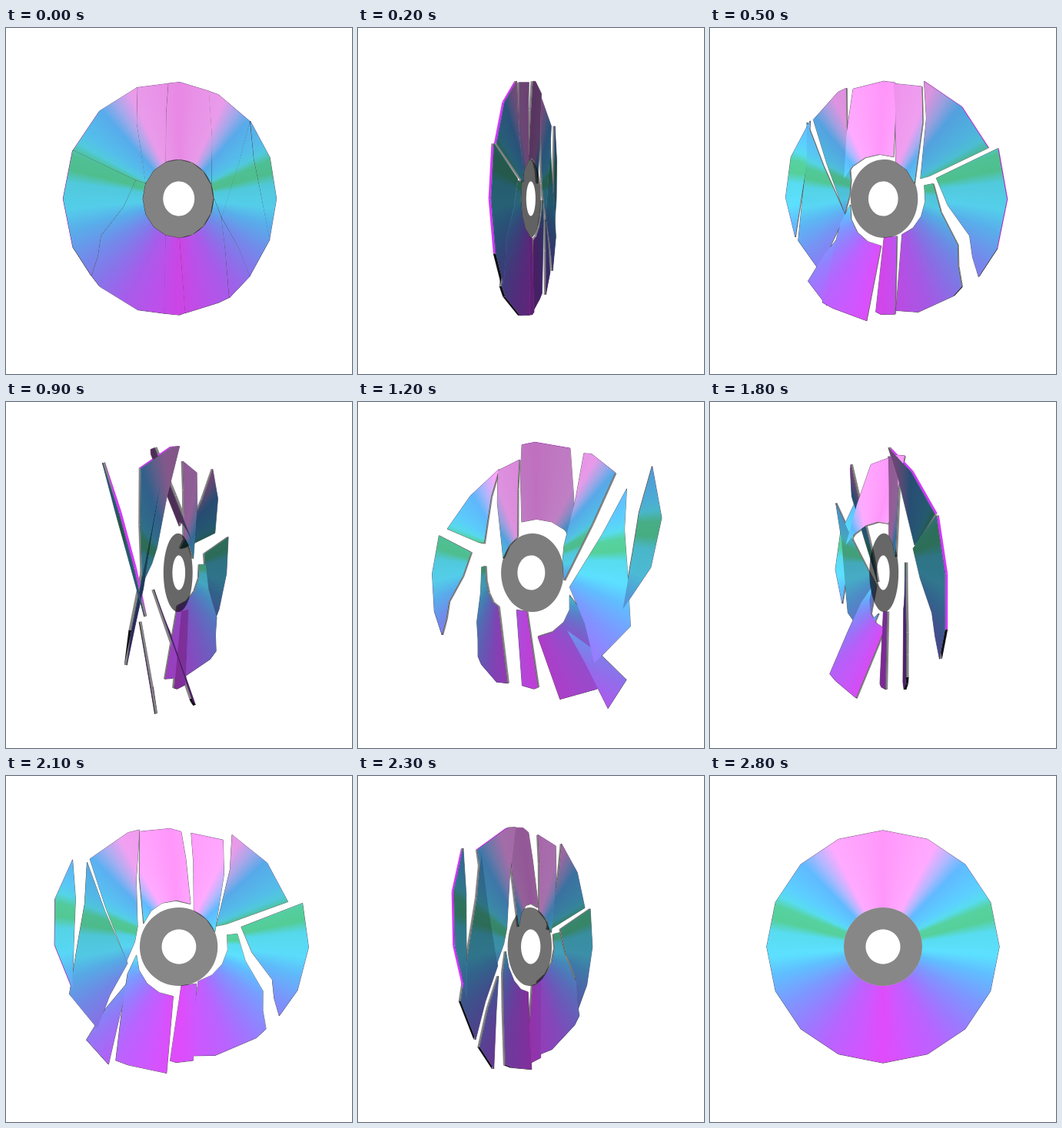
Recreate the animation shown at these times as an HTML page with a canvas. Size 450 by 450 pixels, loop 2.9 s.

```html
<!DOCTYPE html>
<html lang="en">
<head>
<meta charset="utf-8">
<title>Shattering disc</title>
<style>
  html, body { margin: 0; height: 100%; overflow: hidden; background: #fff; }
  canvas { display: block; }
</style>
</head>
<body>
<canvas id="stage" width="450" height="450"></canvas>
<script>
const ctx = document.getElementById('stage').getContext('2d');
const STEPS = 29, STEP_MS = 100, TAU = Math.PI * 2;
const RIM = 151, HUB = 51, HOLE = 22.5, CAMERA = 720, HALF_THICKNESS = 1.5;
const LIGHT = [-0.1, -0.5, 0.86];

// Inner corners of the cracks, relative to the disc centre.
const corners = {
  a: [-16, -148], b: [43, -143], c: [8, 149], d: [-22, 147], e: [74, 134],
  f: [-117, 93], g: [-19, -110], i: [-59, -95], j: [-60, -23], k: [-76, 10],
  l: [-105, 45], m: [-109, 70], n: [48, -80], o: [88, -45], p: [62, 25],
  q: [113, -55], u: [124, -10], s: [88, 65], t: [68, 70]
};

function polar(radius, index, count = 16) {
  const a = index / count * TAU;
  return [radius * Math.sin(a), -radius * Math.cos(a)];
}

// "r3" is rim vertex 3, "h3" is hub vertex 3, single letters are corners.
function outline(text) {
  return text.split(' ').map(name =>
    corners[name] || polar(name[0] === 'r' ? RIM : HUB, +name.slice(1)));
}

function shard(text, shift, turn) {
  const points = outline(text);
  const centre = [0, 1].map(i => points.reduce((sum, p) => sum + p[i], 0) / points.length);
  return { points, centre, shift, turn: turn.map(deg => deg / 360 * TAU) };
}

// Outline, farthest offset (x, y, z) and farthest tilt in degrees (x, y, z).
const shards = [
  shard('r15 r14 r13 j h13 i', [-14, -11, 0], [25, -8, -7]),
  shard('r13 r12 r11 f m l k j', [-43, -2, 0], [8, -8, -5]),
  shard('h9 d r9 r10 f m l k j h13 h12 h11 h10', [-10, 13, 0], [0, -28, -20]),
  shard('r15 a g h15 h14 h13 i', [0, 0, 0], [0, -8, 0]),
  shard('a r0 b n h3 h2 h1 h0 h15 g', [12, -16, 0], [-28, 35, 0]),
  shard('b r1 r2 o p h4 h3 n', [15, -12, 0], [18, -15, 0]),
  shard('r2 q u r5 r6 s p o', [10, 0, 0], [14, 28, 10]),
  shard('r2 r3 r4 r5 u q', [30, -10, 0], [-20, 43, 18]),
  shard('h9 h8 c r8 d', [2, 0, 0], [0, -10, -8]),
  shard('h8 c r7 e t p h4 h5 h6 h7', [14, 22, -15], [-25, 30, -10]),
  shard('p s r6 e t', [20, 33, 0], [-12, 35, -21])
];
const whole = shard([...Array(16).keys()].map(i => 'r' + i).join(' '), [0, 0, 0], [0, 0, 0]);
const circle = radius => Array.from({ length: 64 }, (_, i) => polar(radius, i, 64));

const sheen = ctx.createConicGradient(-Math.PI / 2, 0, 0);
[[0, '#ff96fa'], [14, '#ffa2fd'], [27, '#ffaaff'], [36, '#b0b8ff'], [44, '#60baff'],
 [58, '#5ccfff'], [64, '#58dcf0'], [69, '#56d2a0'], [76, '#55d09a'], [82, '#58dcf0'],
 [95, '#5ce0ff'], [105, '#60beff'], [120, '#7c98ff'], [135, '#987cff'],
 [150, '#b864ff'], [166, '#cd58ff'], [180, '#e04bfa']].forEach(([deg, colour]) => {
  sheen.addColorStop(deg / 360, colour);
  sheen.addColorStop(1 - deg / 360, colour);
});

function rotate([x, y, z], [rx, ry, rz]) {
  [x, y] = [x * Math.cos(rz) - y * Math.sin(rz), x * Math.sin(rz) + y * Math.cos(rz)];
  [y, z] = [y * Math.cos(rx) - z * Math.sin(rx), y * Math.sin(rx) + z * Math.cos(rx)];
  return [x * Math.cos(ry) + z * Math.sin(ry), y, z * Math.cos(ry) - x * Math.sin(ry)];
}

function project([x, y, z]) {
  const scale = CAMERA / (CAMERA - z);
  return [225 + x * scale, 222 + y * scale];
}

function trace(points) {
  points.forEach(([x, y], i) => i ? ctx.lineTo(x, y) : ctx.moveTo(x, y));
  ctx.closePath();
}

// Places one shard in space and works out its visible face and shade.
function pose(piece, spin, spread) {
  const { points, centre: [cx, cy], shift, turn } = piece;
  const tilt = turn.map(a => a * spread);
  const place = (x, y, z = 0) => {
    const local = rotate([x - cx, y - cy, z], tilt);
    const moved = [local[0] + cx, local[1] + cy, local[2]].map((v, i) => v + shift[i] * spread);
    return rotate(moved, [0, spin, 0]);
  };
  const at = (x, y, z) => project(place(x, y, z));
  const [ox, oy] = at(cx, cy);
  const [ux, uy] = at(cx + 10, cy).map((v, i) => (v - [ox, oy][i]) / 10);
  const [vx, vy] = at(cx, cy + 10).map((v, i) => (v - [ox, oy][i]) / 10);
  const side = ux * vy - uy * vx > 0 ? 1 : -1;
  const normal = rotate(rotate([0, 0, side], tilt), [0, spin, 0]);
  const lit = normal.reduce((sum, v, i) => sum + v * LIGHT[i], 0);
  const layer = z => points.map(([x, y]) => at(x, y, z));
  return {
    points,
    face: layer(side * HALF_THICKNESS),
    back: layer(-side * HALF_THICKNESS),
    depth: place(cx, cy)[2],
    shade: Math.min(1, 0.3 + 0.83 * Math.max(0, lit)),
    matrix: [ux, uy, vx, vy, ox - ux * cx - vx * cy, oy - uy * cx - vy * cy]
  };
}

function drawSides({ points, face, back }) {
  points.forEach((p, i) => {
    const j = (i + 1) % points.length, q = points[j];
    const onRim = Math.min(Math.hypot(...p), Math.hypot(...q)) > 144;
    ctx.fillStyle = !onRim ? '#858585' : (p[1] + q[1]) / 2 > 60 ? '#101014' : '#d03cf8';
    ctx.beginPath();
    trace([face[i], face[j], back[j], back[i]]);
    ctx.fill();
  });
  ctx.strokeStyle = 'rgba(0,0,0,.5)';
  ctx.lineWidth = 1;
  ctx.beginPath();
  trace(face);
  ctx.stroke();
}

function drawFace({ face, shade, matrix }, cutout) {
  ctx.beginPath();
  trace(face);
  if (cutout) trace(cutout);
  ctx.save();
  ctx.transform(...matrix);
  ctx.fillStyle = sheen;
  ctx.fill('evenodd');
  ctx.restore();
  ctx.fillStyle = `rgba(0,0,16,${1 - shade})`;
  ctx.fill('evenodd');
}

function drawHub(spin) {
  const ring = radius => circle(radius).map(([x, y]) => project(rotate([x, y, 0], [0, spin, 0])));
  ctx.beginPath();
  trace(ring(HUB));
  trace(ring(HOLE));
  ctx.fillStyle = `rgba(0,0,0,${0.47 + 0.2 * (1 - Math.abs(Math.cos(spin)))})`;
  ctx.fill('evenodd');
}

function draw() {
  const step = (Math.floor(performance.now() / STEP_MS) + 1) % STEPS;
  const spin = 2 * TAU * step / STEPS;
  const spread = Math.sin(Math.PI * step / STEPS) ** 2;
  ctx.clearRect(0, 0, 450, 450);
  if (step === 0) {
    const disc = pose(whole, 0, 0);
    drawSides(disc);
    drawFace(disc, circle(HUB).map(([x, y]) => project([x, y, 0])));
    drawHub(0);
  } else {
    const pieces = shards.map(s => pose(s, spin, spread)).sort((a, b) => a.depth - b.depth);
    pieces.forEach(drawSides);
    pieces.filter(p => p.depth < 0).forEach(p => drawFace(p));
    drawHub(spin);
    pieces.filter(p => p.depth >= 0).forEach(p => drawFace(p));
  }
  requestAnimationFrame(draw);
}
draw();
</script>
</body>
</html>
```
